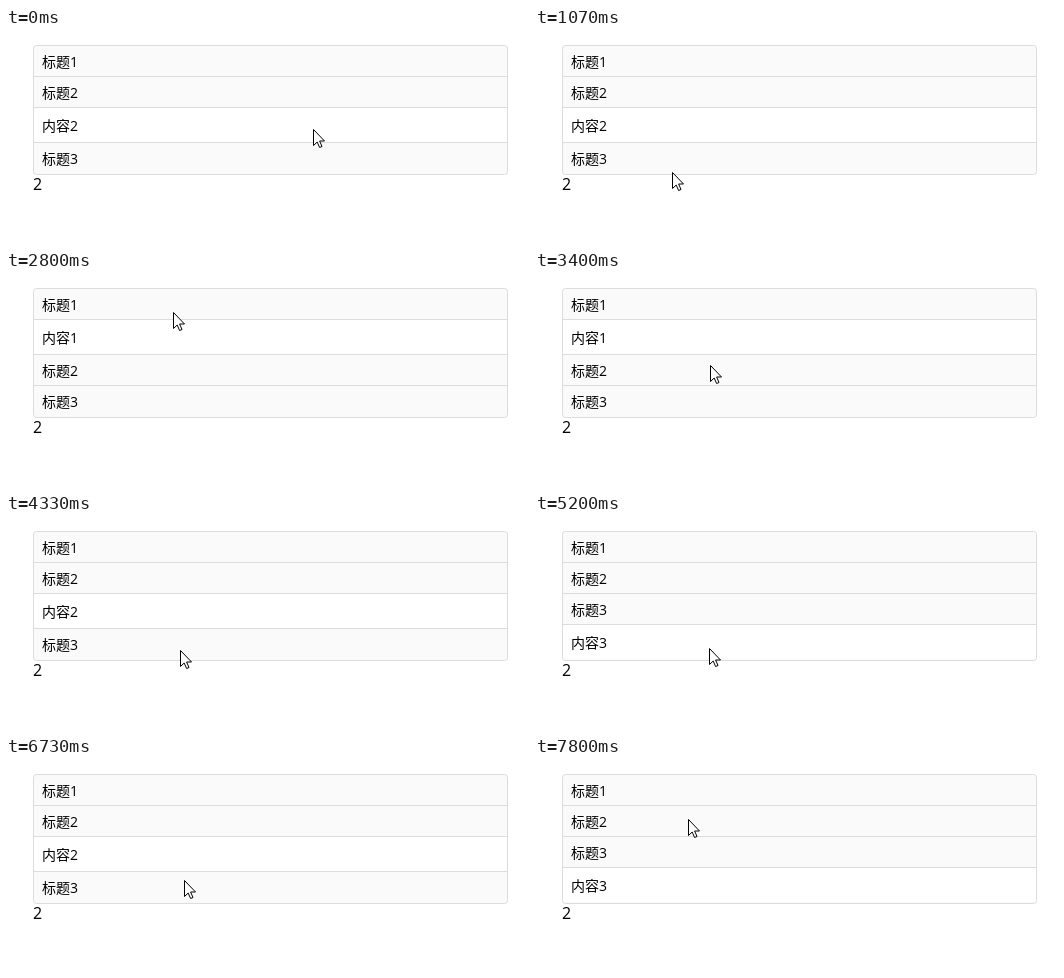
Recreate the animation shown at these times as an HTML page. Size 523 px wide and 215 px high, loop 8000 ms.

```html
<!DOCTYPE html>
<html lang="zh">
<head>
<meta charset="utf-8">
<style>
  html, body { margin: 0; height: 100%; overflow: hidden; background: #fff; }
  svg { display: block; }
  text { font: 14px "Open Sans", "Noto Sans CJK SC", "Noto Sans CJK", sans-serif; }
  .count { font-size: 16px; }
  .line { fill: #dcdcdc; }
  .frame { fill: none; stroke: #dcdcdc; }
  .cursor { fill: #fff; stroke: #000; stroke-linejoin: round; }
</style>
</head>
<body>
<svg width="523" height="215" viewBox="0 0 523 215">
  <rect x="27.5" y="17.5" width="474" height="129" rx="3" fill="#fafafa"/>
  <g id="panel">
    <rect x="28" width="473" height="35" fill="#fff"/>
    <rect class="line" x="28" width="473" height="1"/>
    <text x="36" y="24"></text>
  </g>
  <g id="titles"></g>
  <rect class="frame" x="27.5" y="17.5" width="474" height="129" rx="3"/>
  <text class="count" x="27" y="162">2</text>
  <path id="cursor" class="cursor" d="M.5 .5V16.5L4.2 13 6.6 18.5 9 17.5 6.6 12H11.5Z"/>
</svg>
<script>
const FPS = 15, TICKS = 120, TOP = 17, TITLE = 31, CONTENT = 35;

// Pointer moves: first tick, last tick, x and y reached
const moves = [
  [0, 0, 307, 101], [0, 4, 433, 64], [4, 8, 56, 138], [8, 12, 274, 117],
  [13, 16, 137, 144], [16, 23, 256, 138], [25, 30, 167, 39], [41, 51, 175, 94],
  [59, 65, 174, 136], [77, 86, 187, 68], [95, 103, 176, 133], [110, 113, 153, 62]
];
const clicks = [39, 58, 73, 93, 107];
const sections = [1, 2, 3];

const get = id => document.getElementById(id);
const place = (el, x, y) => el.setAttribute("transform", `translate(${x} ${y})`);
const smooth = u => u * u * (3 - 2 * u);
const titleTop = (n, open) => TOP + (n - 1) * TITLE + (n > open ? CONTENT : 0);

get("titles").innerHTML = sections.map(n => `<g>
  ${n > 1 ? '<rect class="line" x="28" width="473" height="1"/>' : ""}
  <text x="36" y="22">标题${n}</text></g>`).join("");

function pointerAt(tick) {
  let [, , x, y] = moves[0];
  for (const [from, to, toX, toY] of moves.slice(1)) {
    if (tick <= from) break;
    const u = smooth(Math.min(1, (tick - from) / (to - from)));
    x += (toX - x) * u;
    y += (toY - y) * u;
  }
  return [Math.round(x), Math.round(y)];
}

// Each click opens the title under the pointer
function openAt(tick) {
  return clicks.filter(t => t <= tick).reduce((open, t) => {
    const y = pointerAt(t)[1];
    return sections.filter(n => titleTop(n, open) <= y).pop();
  }, 2);
}

const start = performance.now();
function draw() {
  // Small lead keeps steps aligned with times rounded to 10 ms
  const tick = Math.floor((performance.now() - start + 4) * FPS / 1000) % TICKS;
  const open = openAt(tick);
  [...get("titles").children].forEach((el, i) => place(el, 0, titleTop(i + 1, open)));
  place(get("panel"), 0, TOP + open * TITLE);
  get("panel").lastElementChild.textContent = "内容" + open;
  place(get("cursor"), ...pointerAt(tick));
  requestAnimationFrame(draw);
}
draw();
</script>
</body>
</html>
```
